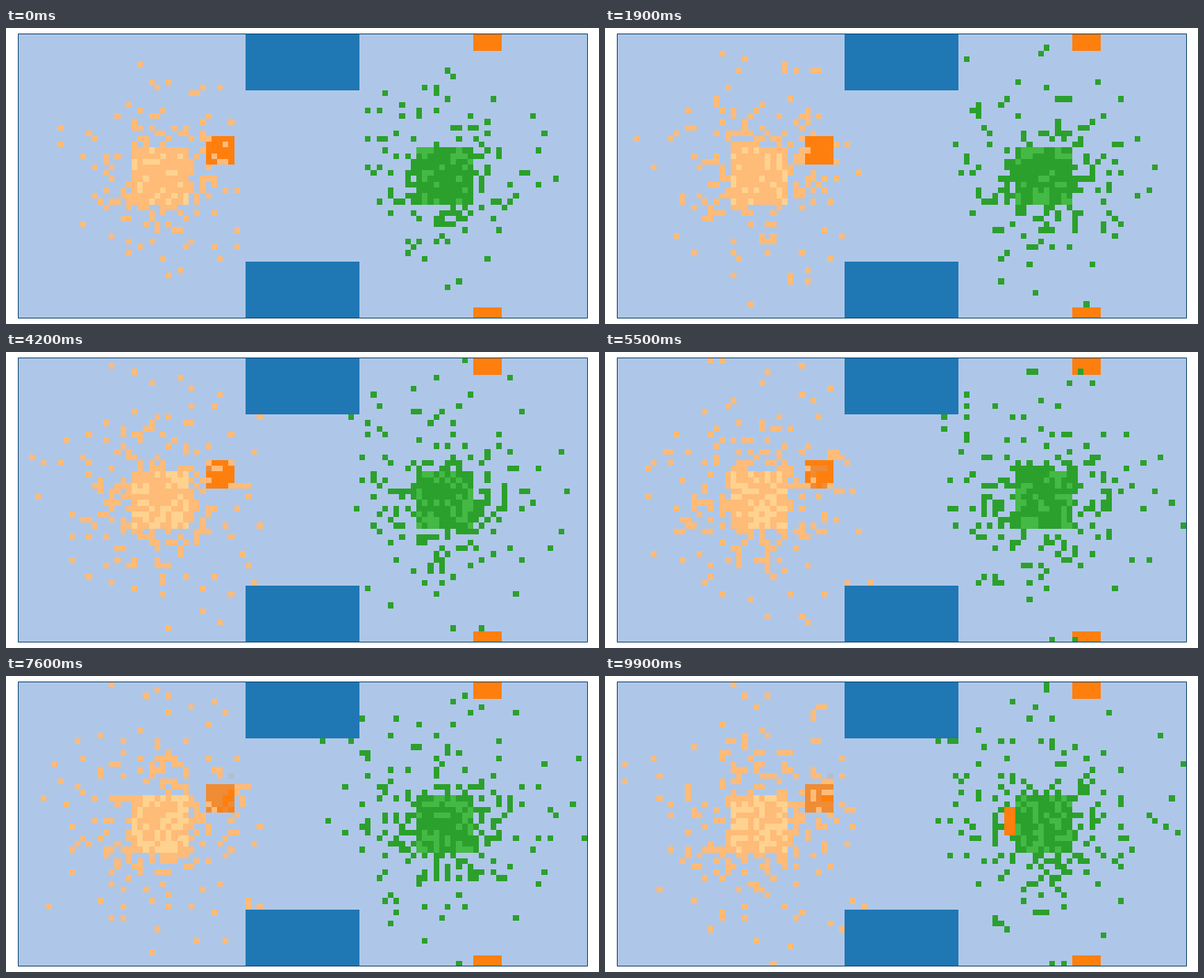
A matplotlib script that plays this animation: 750 px wide and 375 px high, repeating every 10000 ms.

```python
import numpy as np
import matplotlib.pyplot as plt
from matplotlib.animation import FuncAnimation
from matplotlib.colors import to_rgb
from matplotlib.patches import Rectangle

WIDTH, HEIGHT = 750, 375
COLS, ROWS, FRAMES = 100, 50, 100
HOME = 10
GROUND, WALL, FOOD, EATEN, TRACE = map(
    to_rgb, ("#aec7e8", "#1f77b4", "#ff7f0e", "#ef8c34", "#b6bdcf"))
PEACH, PEACH_HOME = to_rgb("#ffbb78"), to_rgb("#ffd28f")
GREEN, GREEN_HOME = to_rgb("#2ca02c"), to_rgb("#44b944")
TRACE_START, LATE_FOOD_START = 50, 92


def scatter(rng, count, spread, reach):
    """Offsets whose density falls off exponentially with distance."""
    radius = rng.gamma(2, spread, count * 2)
    radius = radius[radius < reach][:count]
    angle = rng.uniform(0, 2 * np.pi, count)
    return np.column_stack([radius * np.cos(angle), radius * np.sin(angle)])


def walk(rng, start, end):
    """Random single-cell steps pinned to a start and an end."""
    steps = rng.choice([-1, 0, 1], p=[.15, .7, .15], size=(FRAMES, len(start), 2))
    steps[0] = 0
    path = steps.cumsum(axis=0)
    t = np.linspace(0, 1, FRAMES)[:, None, None]
    drift = start + t ** 0.7 * (end - start) - t * path[-1]
    return np.floor(path + drift).astype(int)


def colony(seed, home_col):
    rng = np.random.default_rng(seed)
    corner = np.array([home_col, 20])
    centre = corner + HOME / 2

    def at_home(count):
        return corner + rng.uniform(0, HOME, (count, 2))

    near = scatter(rng, 210, 4, 20)
    far = near * 1.35 + rng.normal(0, 1, near.shape)
    roamers = walk(rng, centre + near, centre + far)
    leavers = walk(rng, at_home(60), centre + scatter(rng, 60, 5, 16))
    stayers = np.clip(walk(rng, at_home(20), at_home(20)),
                      corner, corner + HOME - 1)

    paths = np.concatenate([roamers, leavers, stayers], axis=1)
    x = np.clip(paths[..., 0], 0, COLS - 1)
    y = np.clip(paths[..., 1], 0, ROWS - 1)
    between_walls = (x >= 40) & (x < 60)
    return x, np.where(between_walls, np.clip(y, 10, 39), y)


def block(grid, col, row, width, height, color):
    grid[row:row + height, col:col + width] = color


base = np.empty((ROWS, COLS, 3))
base[:] = GROUND
block(base, 40, 0, 20, 10, WALL)
block(base, 40, 40, 20, 10, WALL)
block(base, 33, 18, 5, 5, FOOD)
block(base, 80, 0, 5, 3, FOOD)
block(base, 80, 48, 5, 2, FOOD)
block(base, 20, 20, HOME, HOME, PEACH_HOME)
block(base, 70, 20, HOME, HOME, GREEN_HOME)

# When each food cell is first nibbled, side nearest the nest first
eaten_at = np.random.default_rng(5).uniform(20, 75, (5, 5)) + np.arange(5) * 10

colonies = [(colony(11, 20), PEACH), (colony(23, 70), GREEN)]


def world(i):
    grid = base.copy()
    grid[18:23, 33:38][eaten_at <= i] = EATEN
    if i >= TRACE_START:
        block(grid, 37, 16, 1, 1, TRACE)
    for (x, y), color in colonies:
        grid[y[i], x[i]] = color
    if i >= LATE_FOOD_START:
        block(grid, 68, 22, 2, 5, FOOD)
    return grid


fig = plt.figure(figsize=(WIDTH / 100, HEIGHT / 100), dpi=100, facecolor="white")
ax = fig.add_axes([15 / WIDTH, 7 / HEIGHT, 720 / WIDTH, 361 / HEIGHT])
ax.axis("off")
image = ax.imshow(world(0), interpolation="nearest", aspect="auto")

# One-pixel border centred on whole pixels
fig.add_artist(Rectangle((15.5, 7.5), 720, 360, transform=None, fill=False,
                         edgecolor="#174a70", linewidth=0.72, snap=False))


def update(i):
    image.set_data(world(i))
    return [image]


anim = FuncAnimation(fig, update, frames=FRAMES, interval=100, repeat=True,
                     repeat_delay=0)
plt.show()
```
